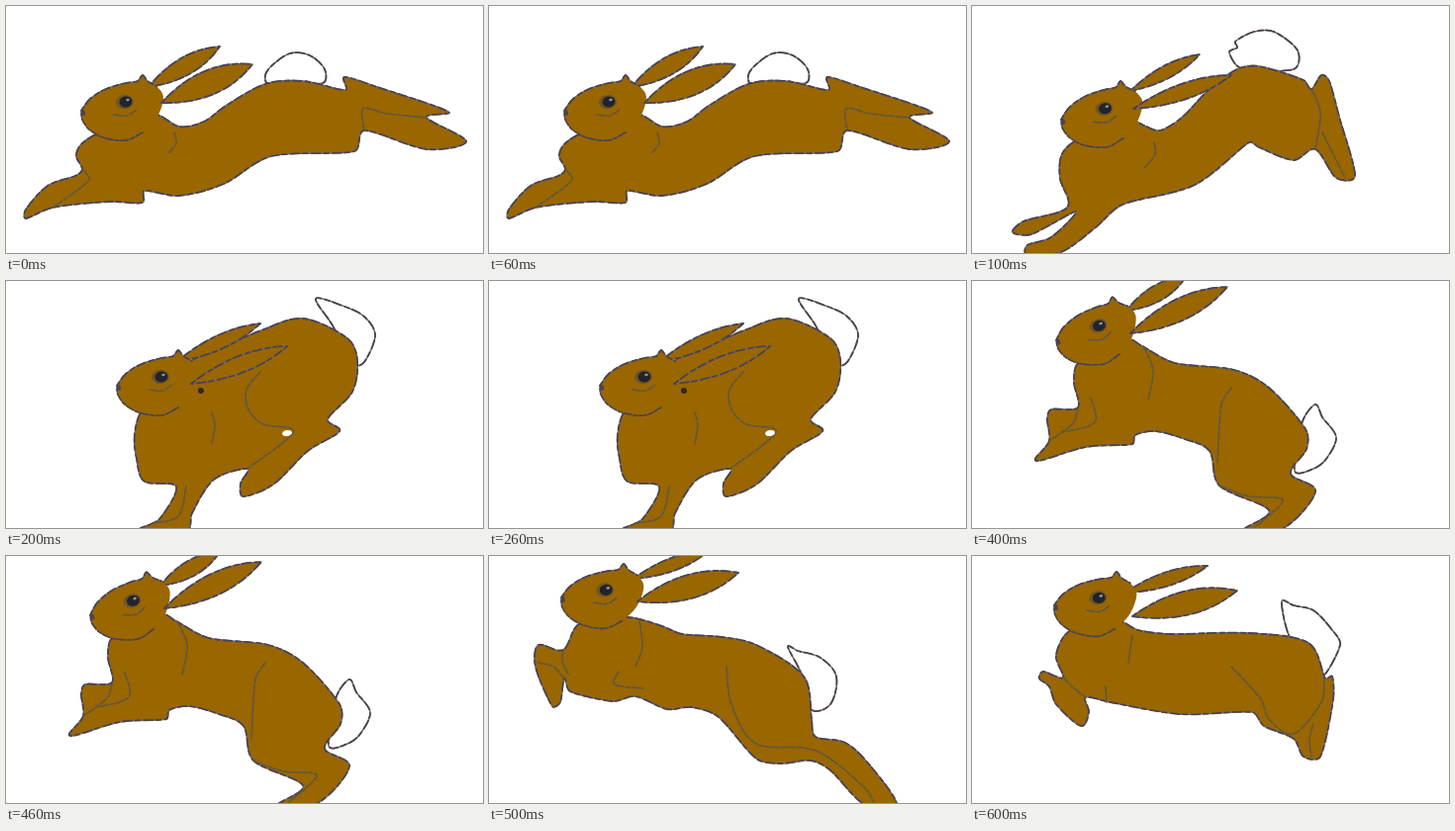
An HTML page with a canvas for the animation above (700 ms loop, 482 px wide and 250 px high).

```html
<!DOCTYPE html>
<html lang="en">
<head>
<meta charset="utf-8">
<title>Running hare</title>
<style>
html, body { margin: 0; width: 100%; height: 100%; overflow: hidden; background: #fff; }
canvas { display: block; }
</style>
</head>
<body>
<canvas id="stage" width="482" height="250"></canvas>
<script>
const ctx = document.getElementById('stage').getContext('2d');
const STEP = 100;
const FUR = '#996600', INK = '#4b4350', SOFT = '#62583c';

// A smooth curve through points written as "x,y x,y ...".
function curve(text, closed) {
  const pts = text.split(' ').map(p => p.split(',').map(Number));
  const n = pts.length;
  const at = i => pts[closed ? (i + n) % n : Math.max(0, Math.min(n - 1, i))];
  const path = new Path2D();
  path.moveTo(...pts[0]);
  for (let i = 0; i < (closed ? n : n - 1); i++) {
    const [a, b, c, d] = [-1, 0, 1, 2].map(k => at(i + k));
    // Handles stay shorter than the segment, so that corners do not loop.
    const size = Math.hypot(c[0] - b[0], c[1] - b[1]) / 3;
    const handle = (p, q) => {
      const [x, y] = [q[0] - p[0], q[1] - p[1]];
      const k = Math.min(1 / 6, size / (Math.hypot(x, y) || 1));
      return [x * k, y * k];
    };
    const [u, v] = [handle(a, c), handle(b, d)];
    path.bezierCurveTo(b[0] + u[0], b[1] + u[1], c[0] - v[0], c[1] - v[1], c[0], c[1]);
  }
  if (closed) path.closePath();
  return path;
}

function ink(path, color, width, dash = []) {
  ctx.strokeStyle = color;
  ctx.lineWidth = width;
  ctx.setLineDash(dash);
  ctx.stroke(path);
}

function edge(path) {
  ink(path, '#74685f', 1.5);
  ink(path, INK, 1.8, [5, 3, 9, 4]);
}

function shape(path, color) {
  ctx.fillStyle = color;
  ctx.fill(path);
  edge(path);
}

function dot(x, y, rx, ry, color) {
  ctx.fillStyle = color;
  ctx.beginPath();
  ctx.ellipse(x, y, rx, ry, -0.15, 0, 2 * Math.PI);
  ctx.fill();
}

const crease = text => ink(curve(text), SOFT, 1.7, [8, 2, 4, 2]);

function ear(x, y, tipX, tipY, width) {
  const dx = tipX - x, dy = tipY - y, len = Math.hypot(dx, dy);
  const nx = -dy / len * width, ny = dx / len * width;
  const path = new Path2D();
  const side = (k, s, ex, ey) => path.quadraticCurveTo(
    x + dx * k + nx * s, y + dy * k + ny * s, ex, ey);
  path.moveTo(x, y);
  side(0.55, -1, tipX, tipY);
  side(0.55, 1, x, y);
  shape(path, FUR);
}

const BROW = '0,0 9,-12 25,-22 45,-28 57,-30 62,-36 67,-30 76,-25';
const CHIN = '62,22 45,30 22,27 8,19 1,9 0,0';
const skull = curve(BROW + ' 83,-14 77,6 ' + CHIN, true);
const brow = curve(BROW), chin = curve(CHIN);

function head(x, y, tilt) {
  ctx.save();
  ctx.translate(x, y);
  ctx.rotate(tilt);
  ctx.fillStyle = FUR;
  ctx.fill(skull);
  edge(brow);
  ink(chin, INK, 1.7, [8, 2, 4, 2]);
  dot(2, 2, 2, 3, INK);
  dot(44, -9, 9, 7, '#6d5527');
  dot(45, -9, 6.5, 5.5, '#242329');
  dot(47, -11, 1.8, 1.3, '#8f969b');
  crease('33,4 46,5 56,-1');
  ctx.restore();
}

function hare(face, farEar, nearEar, tail, body, creases) {
  ctx.setLineDash([]);
  ctx.fillStyle = '#fff';
  ctx.fillRect(0, 0, 482, 250);
  shape(curve(tail, true), '#fff');
  shape(curve(body, true), FUR);
  ear(...farEar);
  head(...face);
  ear(...nearEar);
  creases.forEach(crease);
}

function stretch() {
  hare([76, 106, 0], [144, 82, 216, 41, 18], [157, 98, 249, 59, 25],
    '265,79 262,70 269,60 287,48 307,50 322,64 320,78',
    '150,110 175,122 200,117 222,101 262,79 300,76 343,85 342,72 375,82 447,107 425,113 465,137 425,145 362,126 352,147 268,152 220,180 175,192 140,187 138,199 105,198 47,204 20,215 20,206 42,182 70,172 77,165 71,152 76,140 95,128',
    ['170,128 172,139 165,148', '77,165 84,175 74,185 47,204', '362,126 361,104 385,109 425,113']);
}

function reach() {
  hare([90, 115, -0.05], [160, 86, 230, 49, 13], [163, 104, 262, 70, 16],
    '272,63 260,47 268,42 266,36 285,26 305,26 329,45 325,64',
    '150,112 176,122 190,126 212,113 240,84 268,64 290,61 335,75 343,84 353,70 361,76 371,112 387,172 368,174 347,145 325,156 290,143 280,138 225,181 152,201 125,224 90,249 55,251 56,242 80,234 105,208 60,231 41,229 52,218 96,204 89,175 90,152 102,138',
    ['184,138 185,150 174,164', '343,84 352,108 347,145', '354,128 376,172']);
}

function land() {
  hare([112, 106, 0], [172, 82, 257, 43, 14], [187, 104, 284, 66, 17],
    '330,45 313,18 340,25 362,36 373,55 362,82 350,85',
    '170,100 190,79 230,62 258,50 300,38 345,58 355,80 350,112 325,140 337,152 305,172 270,206 240,218 237,205 244,190 210,201 188,235 183,252 135,252 155,241 172,208 140,203 132,180 130,155 138,130',
    ['208,133 211,146 208,165', '257,92 243,110 245,130 260,145 290,153 244,190', '182,208 174,238 148,245']);
  ctx.setLineDash([]);
  dot(284, 154, 5, 3, '#fff');
  dot(197, 111, 3, 3, '#2d2a25');
}

function gather() {
  hare([85, 85, 0], [162, 68, 239, 40, 13], [165, 92, 268, 67, 19],
    '335,72 331,60 350,37 352,48 378,70 370,108 362,118 343,122',
    '155,85 190,60 235,50 262,45 290,46 315,55 345,92 343,115 289,158 306,183 252,230 240,243 221,238 235,205 276,183 242,162 222,183 201,192 205,215 217,238 202,246 188,230 175,205 178,195 148,195 125,184 110,145 122,112',
    ['195,118 199,128 198,143', '243,92 230,112 232,135 243,162', '178,195 200,187 195,168', '199,245 242,244']);
}

function spring() {
  hare([85, 60, -0.13], [156, 30, 216, -4, 16], [160, 53, 258, 6, 22],
    '334,142 347,125 354,138 368,158 358,180 345,190 326,192',
    '155,58 172,66 205,83 265,90 300,108 337,150 338,170 322,195 347,213 315,250 275,252 300,232 250,207 240,172 215,160 185,152 165,156 162,165 115,168 65,182 78,162 76,140 80,130 107,128 103,102 108,82',
    ['173,66 183,90 178,120', '262,108 252,125 248,185', '107,130 102,144 78,162', '120,118 124,143 92,153', '250,207 280,218 314,222 286,249']);
}

function leap() {
  hare([73, 42, 0.03], [146, 23, 222, -5, 13], [150, 46, 252, 17, 24],
    '316,120 302,92 312,96 335,103 351,122 345,150 325,155',
    '140,62 175,71 195,79 235,82 270,90 318,122 326,165 330,183 360,189 385,212 412,252 380,252 345,217 325,207 295,210 270,205 232,163 205,153 180,155 148,142 125,147 82,137 76,124 72,148 64,152 47,112 50,90 75,95 92,68',
    ['152,66 155,92 148,112', '131,117 127,130 156,134', '240,112 245,150 270,190 330,197 380,235 390,252', '50,108 65,112 76,124', '75,95 74,106 80,120']);
}

function glide() {
  hare([83, 50, 0.03], [155, 37, 238, 10, 14], [162, 61, 268, 35, 24],
    '322,84 313,46 325,50 345,55 364,75 372,90 354,122 345,100',
    '148,66 168,75 200,79 280,78 340,88 357,124 364,122 365,145 352,203 335,203 325,185 295,172 283,158 210,160 140,148 115,143 118,158 110,172 85,150 78,132 68,124 72,117 92,123 85,100 100,75',
    ['162,80 158,108', '262,112 292,145 300,165 325,180 353,148 356,124', '345,170 341,185 343,203', '135,132 136,148', '92,123 102,133 115,143']);
}

const gait = [stretch, reach, land, gather, spring, leap, glide];
ctx.lineJoin = ctx.lineCap = 'round';
const start = performance.now();
function tick() {
  const time = performance.now() - start;
  gait[Math.floor(time / STEP) % gait.length]();
  requestAnimationFrame(tick);
}
tick();
</script>
</body>
</html>
```
